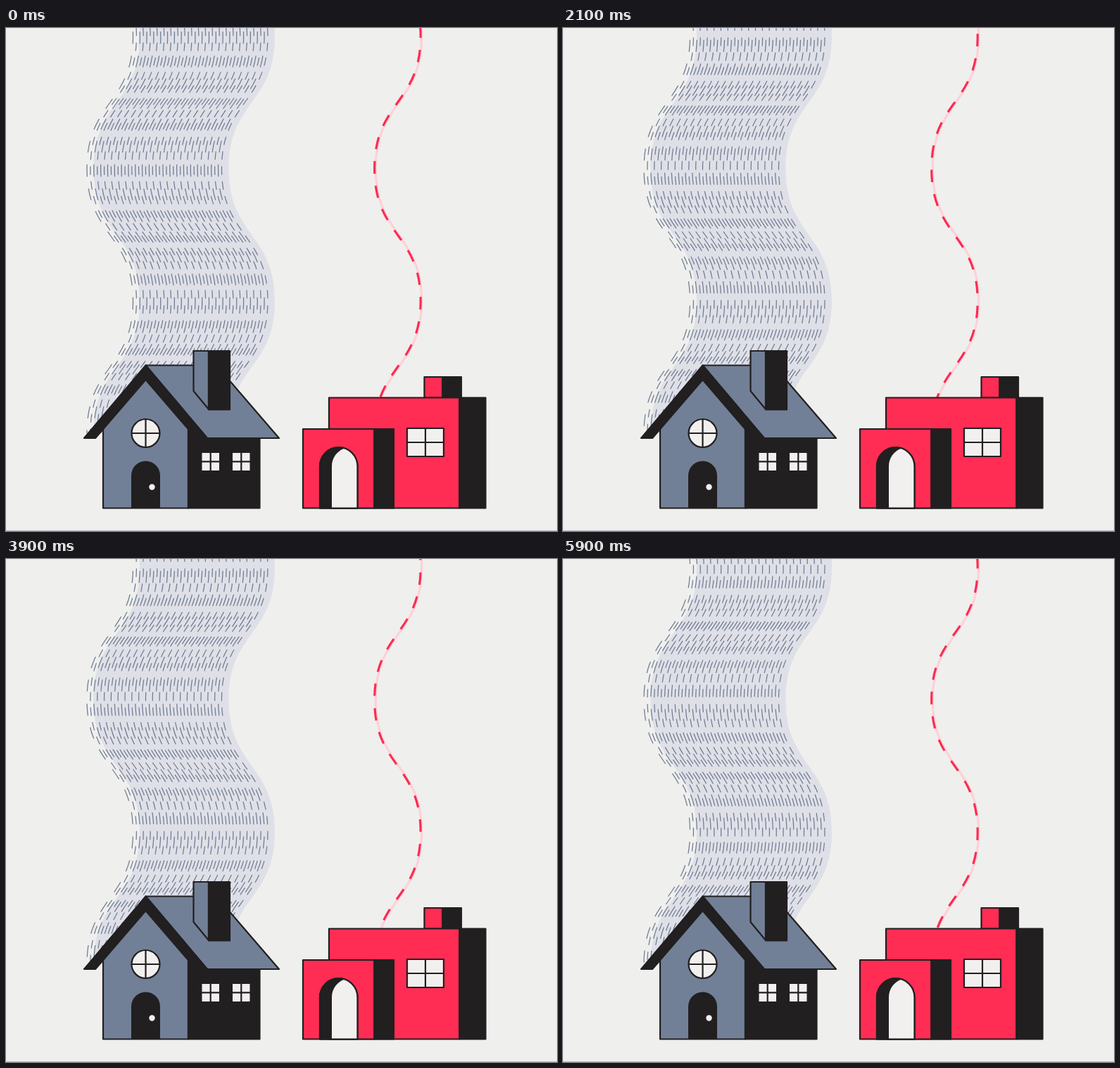
An HTML page that plays this animation: 783 by 715 pixels, repeating every 6000 ms.

```html
<!DOCTYPE html>
<html lang="en">
<head>
<meta charset="utf-8">
<title>Two houses</title>
<style>
  html, body { margin: 0; width: 100%; height: 100%; overflow: hidden; background: #efefed; }
  svg { display: block; }
  .ink { stroke: #211f20; stroke-width: 2.2; stroke-linejoin: round; }
  .blue { fill: #728097; }
  .red { fill: #ff2d53; }
  .dark { fill: #211f20; }
  .pale { fill: #f1f0ee; }
  .trail { fill: none; stroke-width: 3.2; }
  .hatch { fill: none; stroke: #6f7b92; stroke-width: 1.25; }
</style>
</head>
<body>
<svg width="783" height="715" viewBox="0 0 783 715">
  <path id="band" fill="#dfe0e7"/>
  <path id="long" class="hatch"/>
  <path id="short" class="hatch"/>
  <path id="trail" class="trail" stroke="#ffd0d7"/>
  <path id="dashes" class="trail" stroke="#fb2c53"/>

  <g class="ink">
    <path class="blue" d="M138 682.5V568L198 497L259 568V682.5Z"/>
    <path class="dark" d="M259 550L290 580H360.5V682.5H259Z"/>
    <path class="blue" d="M198.5 479.5H299L388 583H286Z"/>
    <path class="dark" d="M198.5 479.5L286 583H270L198.5 500L127 583H111Z"/>
    <path class="blue" d="M266.5 459H288V542L266.5 516Z"/>
    <path class="dark" d="M288 459H318V542.5H288Z"/>
    <circle class="pale" cx="198.5" cy="576" r="20"/>
    <path d="M178.5 576H218.5M198.5 556V596"/>
    <path class="dark" stroke="none" d="M178 682V636A20.5 20.5 0 0 1 219 636V682Z"/>
  </g>
  <circle class="pale" cx="207.5" cy="652.5" r="4.2"/>
  <path class="pale" d="M278.5 604H303V629H278.5ZM322 604H346.5V629H322Z"/>
  <path class="ink" d="M290.7 604V629M278 616.3H303M334.3 604V629M322 616.3H347"/>

  <g class="ink">
    <path class="red" d="M594.5 496H620.5V525.5H594.5Z"/>
    <path class="dark" d="M620.5 496H647V525.5H620.5Z"/>
    <path class="red" d="M459 525.5H644.5V682.5H459Z"/>
    <path class="dark" d="M644.5 525.5H681.5V682.5H644.5Z"/>
    <path class="red" d="M422 570H523.5V682.5H422Z"/>
    <path class="dark" d="M523.5 570H551V682.5H523.5Z"/>
    <path class="dark" d="M446 682.5V623A26.75 27 0 0 1 499.5 623V682.5Z"/>
    <path class="pale" stroke="none" d="M463 682V623A26.75 27 0 0 1 481 597.5A26.75 27 0 0 1 499.5 623V682Z"/>
    <path fill="none" d="M446 682.5V623A26.75 27 0 0 1 499.5 623V682.5Z"/>
    <path class="pale" d="M570 569H622V609H570ZM596 569V609M570 589H622"/>
  </g>
  <path stroke="#b9bcc3" d="M0 714.5H783"/>
</svg>
<script>
const LOOP = 6000, STEP = 100, HATCH_CYCLE = 900;
const TOP = -176, HALF = 188, SWING = 65.5, PULL = 0.51;
const COLUMNS = 40, PITCH = 4.91;
const get = id => document.getElementById(id);
const setPath = (id, d) => get(id).setAttribute("d", d);

// Two full S-waves, starting and ending at the left extreme.
const bend = (dx, dy) => `c0 ${PULL * dy} ${dx} ${dy - PULL * dy} ${dx} ${dy}`;
const waves = dy => (bend(SWING, dy) + bend(-SWING, dy)).repeat(2);
const strand = x => `M${x} ${TOP}${waves(HALF)}`;

// Every second hatch column, beginning with the given one.
function columns(first) {
  let d = "";
  for (let c = first; c < COLUMNS; c += 2) d += strand(115 + c * PITCH);
  return d;
}

setPath("band", `${strand(316.5)}h-192${waves(-HALF)}z`);
setPath("long", columns(0));
setPath("short", columns(1));
setPath("trail", strand(525.2));
setPath("dashes", strand(523.7));

const middle = get("trail").getTotalLength() / 2;

// Centres one dash at `shift` along the strand from its middle.
function setDashes(id, dash, period, shift) {
  const style = get(id).style;
  style.strokeDasharray = `${dash} ${period - dash}`;
  style.strokeDashoffset = dash / 2 - middle - shift;
}

function draw(now) {
  const time = Math.floor((now % LOOP) / STEP) * STEP;
  const cycle = (time % HATCH_CYCLE) / HATCH_CYCLE;
  // The two kinds of column slide in opposite directions.
  setDashes("long", 17, 34, 2.5 + 34 * cycle);
  setDashes("short", 12, 21.25, 2.5 - 21.25 * cycle);
  setDashes("dashes", 17.6, 34.7, 34.7 * time / LOOP - 2);
  requestAnimationFrame(draw);
}
requestAnimationFrame(draw);
</script>
</body>
</html>
```
